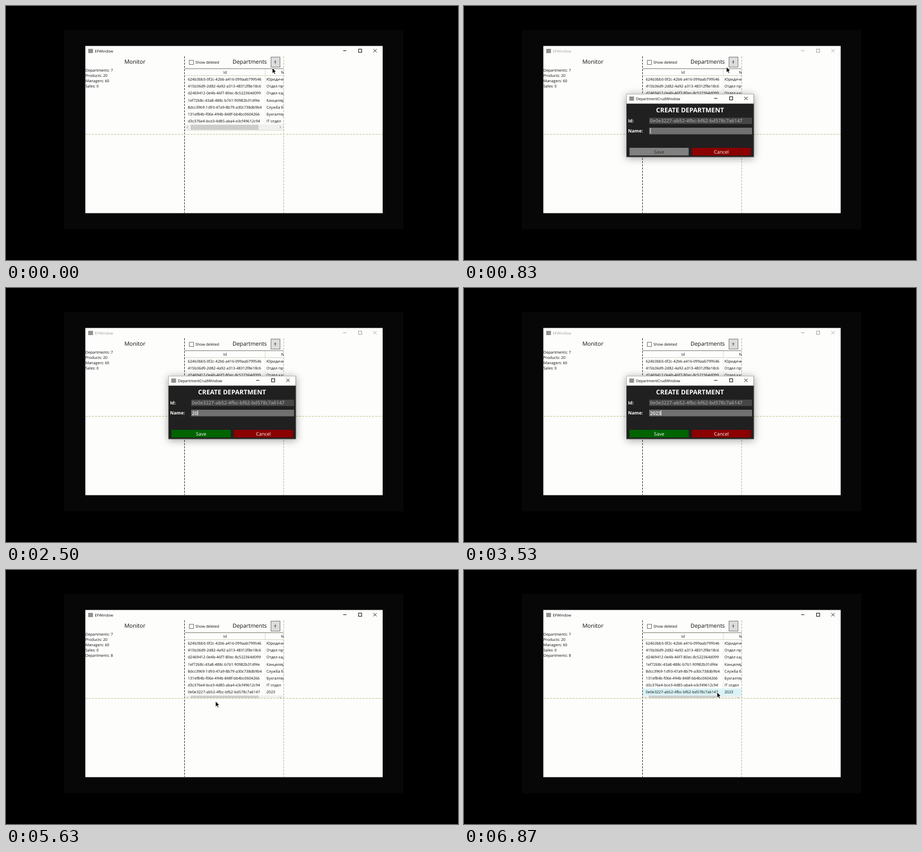
An HTML page with a canvas for the animation above (6.91 s loop, 852 by 480 pixels).

```html
<!DOCTYPE html>
<html lang="en">
<head>
<meta charset="utf-8">
<title>Department manager</title>
<style>
html, body { margin: 0; width: 100%; height: 100%; overflow: hidden; background: #000; }
canvas { display: block; width: 852px; height: 480px; }
</style>
</head>
<body>
<canvas id="stage" width="852" height="480"></canvas>
<script>
const stage = document.getElementById('stage').getContext('2d');
const layer = document.createElement('canvas');
layer.width = 852;
layer.height = 480;
const overlay = layer.getContext('2d');
let ctx = stage;

const LOOP = 6910;
const OPEN = 480, SHOWN = 680;      // dialog fades in
const CLOSE = 5000, GONE = 5150;    // dialog fades out
const KEYS = [2200, 2450, 2650, 2900];
const NAME = '2023';
const NEW_ID = '0e0e3227-ab52-4fbc-bf62-bd578c7a6147';
const PAPER = '#fdfdfc', INK = '#0c0c0c', SPLIT = '#c4c488';

const rows = [
  ['624b3bb5-0f2c-42b6-a416-099aab799546', 'Юридический отдел'],
  ['415b36d9-2d82-4a92-a313-48312f8e18c6', 'Отдел продаж'],
  ['d2469412-0e4b-46f7-80ec-8c522364d099', 'Отдел кадров'],
  ['1ef7268c-43a8-488c-b761-90982b31df4e', 'Канцелярия'],
  ['8dcc3969-1d93-47a9-8b79-a30c738db9b4', 'Служба безопасности'],
  ['131ef84b-f06e-494b-848f-bb4bc0604266', 'Бухгалтерия'],
  ['d3c376e4-bce3-4d85-aba4-e3cf49612c94', 'IT отдел'],
  [NEW_ID, NAME]
];

// Pointer stops: time, x, y
const path = [
  [0, 502, 117], [120, 502, 117], [380, 499, 111], [760, 499, 111],
  [1400, 375, 233], [3900, 375, 233], [4350, 361, 291], [4650, 361, 291],
  [4850, 370, 276], [5150, 371, 276], [5560, 395, 248], [5800, 395, 248],
  [6600, 477, 231], [LOOP, 477, 231]
];

const clamp = v => Math.max(0, Math.min(1, v));
const smooth = v => v * v * (3 - 2 * v);

function pointer(t) {
  const i = Math.max(1, path.findIndex(p => p[0] >= t));
  const [a, b] = [path[i - 1], path[i]];
  const k = smooth(clamp((t - a[0]) / (b[0] - a[0])));
  return [a[1] + (b[1] - a[1]) * k, a[2] + (b[2] - a[2]) * k];
}

function rect(x, y, w, h, fill) {
  ctx.fillStyle = fill;
  ctx.fillRect(x, y, w, h);
}

function frame(x, y, w, h, color) {
  ctx.strokeStyle = color;
  ctx.lineWidth = 1;
  ctx.strokeRect(x + 0.5, y + 0.5, w - 1, h - 1);
}

function line(x1, y1, x2, y2, color, dash = []) {
  ctx.strokeStyle = color;
  ctx.lineWidth = 1;
  ctx.setLineDash(dash);
  ctx.beginPath();
  ctx.moveTo(x1, y1);
  ctx.lineTo(x2, y2);
  ctx.stroke();
  ctx.setLineDash([]);
}

function text(s, x, y, size = 7.15, color = INK, weight = 400, align = 'left') {
  ctx.font = `${weight} ${size}px "Open Sans", "Noto Sans", sans-serif`;
  ctx.fillStyle = color;
  ctx.textAlign = align;
  ctx.fillText(s, x, y);
}

function caption(label, x, y, right, gap, color) {
  rect(x, y - 4, 9, 8, '#8e948c');
  text(label, x + 12.5, y + 2.9, 7.15, color);
  const cy = Math.round(y) - 0.5;
  const minX = right - 2 * gap, maxX = right - gap;
  line(minX - 3, cy, minX + 3, cy, color);
  frame(Math.round(maxX) - 3, cy - 3.5, 7, 7, color);
  line(right - 3, cy - 3, right + 3, cy + 3, color);
  line(right - 3, cy + 3, right + 3, cy - 3, color);
}

function scrollbar(y) {
  rect(337, y, 186, 10.5, '#f0f0ee');
  rect(348, y + 0.5, 128, 9.5, '#cdcdcb');
  for (const [x, d] of [[342, 1], [517, -1]]) {
    ctx.strokeStyle = '#8c8c8c';
    ctx.beginPath();
    ctx.moveTo(x + d, y + 3);
    ctx.lineTo(x - d, y + 5.2);
    ctx.lineTo(x + d, y + 7.4);
    ctx.stroke();
  }
}

function table(count, hover) {
  ctx.save();
  ctx.beginPath();
  ctx.rect(337, 118, 186, 124);
  ctx.clip();
  line(337, 118.5, 523, 118.5, '#78786e');
  text('Id', 413, 128, 7.15, INK, 400, 'center');
  text('Name', 518.5, 128);
  line(337, 131.5, 523, 131.5, '#d2d2bc');
  line(488.5, 119, 488.5, 131, '#d8d8cc');
  if (hover) rect(337, 224, 186, 13, '#d9f3f6');
  for (let i = 0; i < count; i++) {
    const y = 141.2 + i * 13.12;
    text(rows[i][0], 342.7, y);
    text(rows[i][1], 491, y);
  }
  const y = count > 7 ? 237 : 224;
  line(488.5, 132, 488.5, y, '#efefec');
  scrollbar(y);
  if (count < 8) line(337, 235, 523, 235, '#dcdcd2');
  ctx.restore();
}

function mainWindow(active, added, hover) {
  rect(109, 45, 640, 377, '#070707');
  rect(149.5, 75.5, 560.5, 316, PAPER);
  caption('EFWindow', 155, 85, 695.5, 28.5, active ? INK : '#a0a0a0');

  text('Monitor', 243, 109.3, 10.6, INK, 400, 'center');
  const log = ['Departments: 7', 'Products: 20', 'Managers: 60', 'Sales: 0'];
  if (added) log.push('Departments: 8');
  log.forEach((s, i) => text(s, 149.7, 123.8 + i * 10));

  frame(345, 102, 9, 9, '#707070');
  text('Show deleted', 357, 108.8);
  text('Departments', 427, 109.3, 10.5);
  rect(499, 96, 18, 20, '#dcdcdc');
  frame(499, 96, 18, 20, '#777777');
  line(505.5, 105.5, 509.5, 105.5, '#666666');
  line(507.5, 103, 507.5, 109, '#444444');

  table(added ? 8 : 7, hover);
  line(336.5, 95, 336.5, 391, '#2a2a2a', [4, 2]);
  line(523.5, 95, 523.5, 391, '#b4b4a0', [4, 2]);
  line(150, 242.5, 710, 242.5, SPLIT, [4, 2]);
}

function button(label, x, fill, color) {
  rect(x, 268, 111.5, 14.5, fill);
  text(label, x + 55.7, 278.9, 9, color, 400, 'center');
}

function dialog(typed, t) {
  ctx.save();
  ctx.shadowColor = 'rgba(0,0,0,0.36)';
  ctx.shadowBlur = 14;
  ctx.shadowOffsetY = 2;
  rect(306, 166, 240.5, 119.5, '#202020');
  ctx.restore();
  rect(306, 166, 240.5, 18.5, PAPER);
  frame(306, 166, 240.5, 119.5, 'rgba(110,110,110,0.5)');
  caption('DepartmentCrudWindow', 311.5, 175, 531.5, 28.5, INK);

  const pale = '#ffffff';
  text('CREATE DEPARTMENT', 426, 201.2, 12.1, pale, 700, 'center');
  text('Id:', 309.3, 220.4, 8.5, pale, 700);
  text('Name:', 309.3, 239.3, 8.5, pale, 700);
  rect(349, 211, 194, 12, '#464646');
  text(NEW_ID, 350.6, 220.3, 9.05, '#a4a4a4', 600);
  rect(349, 230, 194, 12.5, '#707070');
  text(typed, 350.5, 239.5, 9.1, pale, 600);
  const end = 350.5 + (typed ? ctx.measureText(typed).width : 0);
  if (t > SHOWN && (typed || t % 1060 > 530)) {
    rect(Math.round(end), 231, 1, 10, '#e4e4e4');
  }

  if (typed) button('Save', 312, '#006400', pale);
  else button('Save', 312, '#808080', '#303030');
  button('Cancel', 429.5, '#8b0000', pale);
}

// The dialog fades and scales as one flat picture.
function showDialog(k, typed, t) {
  ctx = overlay;
  ctx.clearRect(0, 0, 852, 480);
  dialog(typed, t);
  ctx = stage;
  const scale = 1 - 0.15 * (1 - k) ** 3;
  ctx.save();
  ctx.globalAlpha = Math.min(1, k * 1.25);
  ctx.translate(426, 225.5);
  ctx.scale(scale, scale);
  ctx.drawImage(layer, -426, -225.5);
  ctx.restore();
}

function arrow(x, y) {
  const pts = [[0, 0], [0, 10.5], [2.4, 8.3], [4.1, 12], [5.8, 11.2], [4.2, 7.6], [7.3, 7.4]];
  ctx.beginPath();
  pts.forEach(([px, py]) => ctx.lineTo(x + px, y + py));
  ctx.closePath();
  ctx.fillStyle = '#000';
  ctx.strokeStyle = PAPER;
  ctx.lineWidth = 0.8;
  ctx.fill();
  ctx.stroke();
}

function beam(x, y) {
  rect(x - 0.5, y - 4.5, 1, 10, '#fff');
  rect(x - 2.5, y - 5, 5, 1, '#fff');
  rect(x - 2.5, y + 4.5, 5, 1, '#fff');
}

function draw(t) {
  const [x, y] = pointer(t);
  const added = t >= 5050;
  const typed = NAME.slice(0, KEYS.filter(k => t >= k).length);
  const hover = added && x > 337 && x < 523 && y > 224 && y < 237;

  rect(0, 0, 852, 480, '#000');
  mainWindow(t < OPEN || t >= CLOSE, added, hover);

  if (t > OPEN && t < GONE) {
    const k = t < CLOSE ? (t - OPEN) / (SHOWN - OPEN) : (GONE - t) / (GONE - CLOSE);
    showDialog(clamp(k), typed, t);
  }

  const typing = t >= KEYS[0] && t < 3920;
  const inField = t > SHOWN && t < CLOSE && x > 349 && x < 543 && y > 230 && y < 242;
  if (!typing) (inField ? beam : arrow)(x, y);
}

stage.textRendering = overlay.textRendering = 'geometricPrecision';
const start = performance.now();
function tick() {
  draw((performance.now() - start) % LOOP);
  requestAnimationFrame(tick);
}
tick();
</script>
</body>
</html>
```
